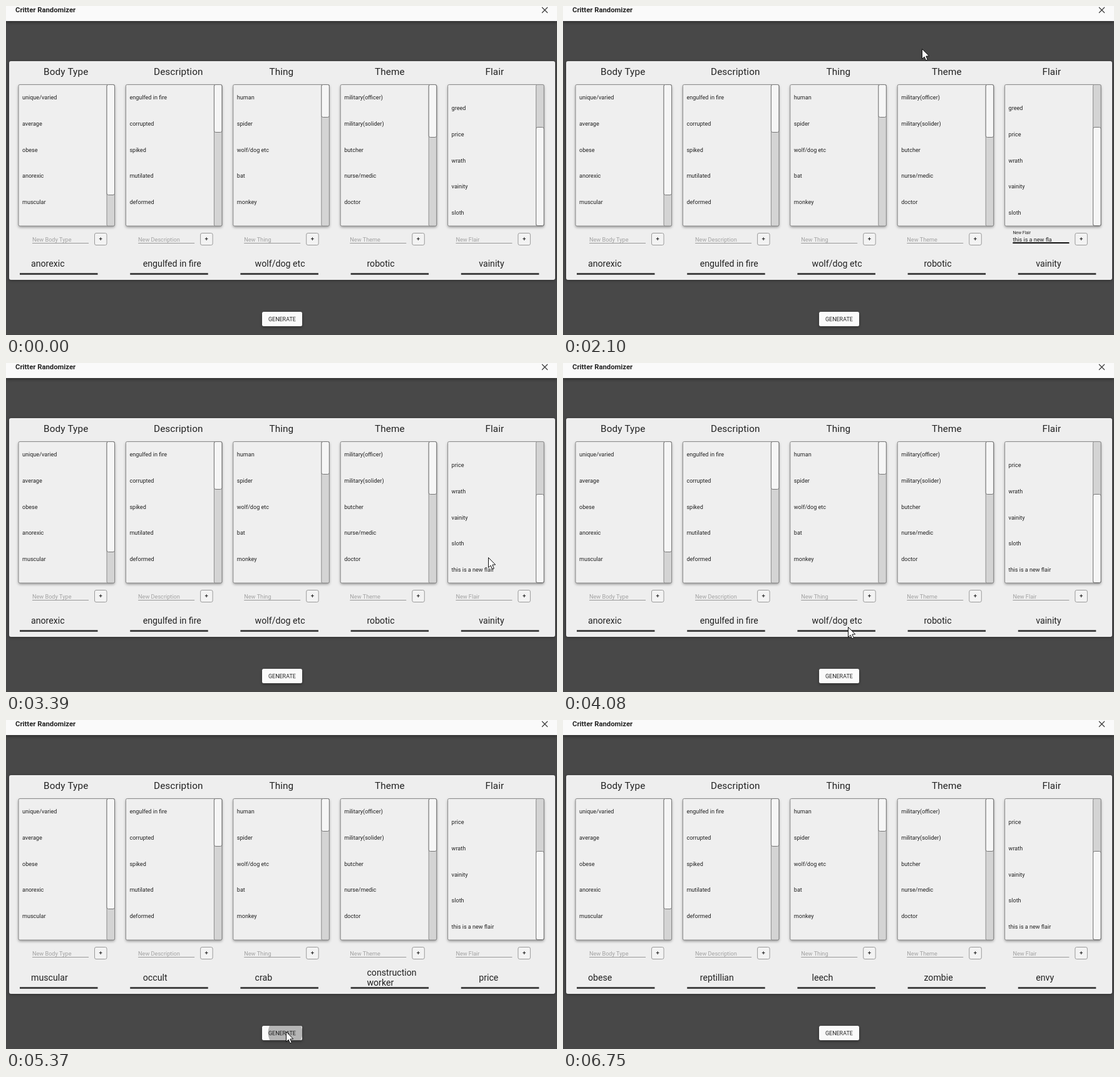
Animation of 880x525 px, one loop 7020 ms. Source, as an HTML page with a canvas:

```html
<!DOCTYPE html>
<html lang="en">
<head>
<meta charset="utf-8">
<title>Critter Randomizer</title>
<style>
  html, body { margin: 0; width: 100%; height: 100%; overflow: hidden; background: #484848; }
  canvas { display: block; width: 880px; height: 525px; }
</style>
</head>
<body>
<canvas id="stage" width="880" height="525"></canvas>
<script>
const ctx = document.getElementById('stage').getContext('2d');
const LOOP = 7020, STEP = 30;
const ROW = 41.8, LIST_TOP = 125.5, LIST_H = 225.5;
const ADDED = 2970, CLICK_FIELD = 240, BLUR = 2640;

const columns = [
  { name: 'Body Type', x: 60, thumb: [126, 302], items: ['unique/varied', 'average', 'obese', 'anorexic', 'muscular'] },
  { name: 'Description', x: 236, thumb: [126, 202], items: ['engulfed in fire', 'corrupted', 'spiked', 'mutilated', 'deformed'] },
  { name: 'Thing', x: 420.5, thumb: [126, 178], items: ['human', 'spider', 'wolf/dog etc', 'bat', 'monkey'] },
  { name: 'Theme', x: 589, thumb: [126, 210], items: ['military(officer)', 'military(solider)', 'butcher', 'nurse/medic', 'doctor'] },
  { name: 'Flair', x: 765.5, items: ['lust', 'greed', 'price', 'wrath', 'vainity', 'sloth'] }
];
const newFlair = 'this is a new flair';

const results = [
  [0, 'anorexic', 'engulfed in fire', 'wolf/dog etc', 'robotic', 'vainity'],
  [4650, 'average', 'corrupted', 'spider', 'butcher', 'gluttony'],
  [5130, 'muscular', 'occult', 'crab', 'construction\nworker', 'price'],
  [5520, 'anorexic', 'spiked', 'bat', 'doctor', 'gluttony'],
  [5940, 'obese', 'mammalian', 'wolf/dog etc', 'nurse/medic', 'sloth'],
  [6510, 'obese', 'reptillian', 'leech', 'zombie', 'envy']
];
const clicks = [4380, 4860, 5220, 5640, 6225];

// typed length at each moment
const typing = [[0, 0], [1050, 2], [1080, 4], [1290, 7], [1500, 9], [1560, 13], [2010, 15], [2070, 17], [2130, 19]];

// pointer path: time, x, y
const path = [
  [90, 830, 372], [210, 786, 368], [270, 786, 368], [630, 573, 68], [2130, 573, 68],
  [2520, 826, 383], [2670, 832, 377], [2880, 832, 377], [3030, 853, 264], [3090, 854, 262],
  [3270, 854, 288], [3390, 770, 310], [3480, 680, 325], [3570, 755, 333], [3750, 430, 372],
  [3900, 168, 410], [4080, 455, 421], [4290, 447, 486], [4350, 447, 497], [6540, 447, 497], [6750, 892, 118]
];

const clamp = v => Math.max(0, Math.min(1, v));
const ease = v => { v = clamp(v); return v * v * (3 - 2 * v); };
const latest = (list, t) => list.filter(k => k[0] <= t).pop();

function slope(i, a) {
  const p = path[i - 1], c = path[i], n = path[i + 1];
  if (!p || !n || (c[a] - p[a]) * (n[a] - c[a]) <= 0) return 0;
  return (n[a] - p[a]) / (n[0] - p[0]);
}

function pointerAt(t) {
  const i = path.findIndex(k => k[0] > t) - 1;
  if (i < 0) return null;
  const a = path[i], b = path[i + 1], d = b[0] - a[0], u = (t - a[0]) / d;
  return [1, 2].map(k =>
    a[k] + (b[k] - a[k]) * u * u * (3 - 2 * u) +
    d * u * (1 - u) * (slope(i, k) * (1 - u) - slope(i + 1, k) * u));
}

function text(s, x, y, size, color = '#222', weight = 400, spacing = 0) {
  ctx.font = `${weight} ${size}px Roboto, sans-serif`;
  ctx.letterSpacing = spacing + 'px';
  ctx.fillStyle = color;
  ctx.fillText(s, x, y);
}

function rect(x, y, w, h, r, fill, stroke) {
  ctx.beginPath();
  ctx.roundRect(x, y, w, h, r);
  ctx.fillStyle = fill;
  ctx.fill();
  if (stroke) {
    ctx.shadowColor = 'transparent';
    ctx.strokeStyle = stroke;
    ctx.lineWidth = 1;
    ctx.stroke();
  }
}

function shadowed(blur, dy, alpha, draw) {
  ctx.save();
  ctx.shadowColor = `rgba(0,0,0,${alpha})`;
  ctx.shadowBlur = blur;
  ctx.shadowOffsetY = dy;
  draw();
  ctx.restore();
}

function bar(x, y, w, h, color) {
  ctx.fillStyle = color;
  ctx.fillRect(x, y, w, h);
}

function drawHeader() {
  shadowed(5, 2, 0.4, () => rect(0, -10, 880, 34, 0, '#fafafa'));
  text('Critter Randomizer', 15, 10, 11.3, '#222', 700);
  ctx.strokeStyle = '#333';
  ctx.lineWidth = 1.1;
  ctx.beginPath();
  ctx.moveTo(856, 2); ctx.lineTo(865, 11);
  ctx.moveTo(865, 2); ctx.lineTo(856, 11);
  ctx.stroke();
}

function drawList(col, i, t) {
  const x = 20 + 171.4 * i, w = 153.5;
  let { items, thumb } = col, first = 149;
  if (i === 4) {
    const added = t >= ADDED, drag = ease((t - 3090) / 180);
    first = 124.2 - (added ? ROW * drag : 0);
    const top = added ? 186 + 24 * drag : 194;
    thumb = [top, top + (added ? 141 : 157)];
    if (added) items = items.concat(newFlair);
  }
  shadowed(4, 2, 0.4, () => rect(x, LIST_TOP, w, LIST_H, 2, '#efefef', '#8a8a8a'));
  ctx.save();
  ctx.beginPath();
  ctx.rect(x + 0.5, 126, w - 1, LIST_H - 1);
  ctx.clip();
  items.forEach((s, k) => text(s, x + 6, first + ROW * k, 9.07));
  ctx.restore();
  rect(x + w - 12.5, LIST_TOP, 12.5, LIST_H, 2, '#d4d4d4', '#8a8a8a');
  rect(x + w - 12.5, thumb[0] - 0.5, 12.5, thumb[1] - thumb[0], 2.5, '#f6f6f6', '#777');
}

function drawField(col, i, t) {
  const x = 42 + 169.1 * i, flair = i === 4;
  const focused = flair && t >= CLICK_FIELD && t < BLUR;
  const up = flair ? ease((t - CLICK_FIELD) / 300) * (1 - ease((t - ADDED) / 240)) : 0;
  const grey = '#a2a2a2';
  text('New ' + col.name, x, 375.5 - 11.7 * up, 9.15 - 2.25 * up, focused ? '#222' : grey);
  if (flair && t < ADDED) {
    const typed = newFlair.slice(0, latest(typing, t)[1]);
    text(typed, x, 375.5, 9.07, t < 2010 ? '#666' : '#222');
  }
  if (focused) {
    const grow = ease((t - CLICK_FIELD) / 240);
    bar(x, 378, 90, 1, '#999');
    bar(x + 45 * (1 - grow), 377, 90 * grow, 2, '#111');
  } else {
    bar(x, 378, 90, 1, '#999');
  }
  const pressed = flair && t >= 2670 && t < 3000;
  rect(x + 99.5, 362.5, 19.5, 19, 2.5, pressed ? '#d8d8d8' : '#f3f3f3', '#9a9a9a');
  text('+', x + 106.5, 375.2, 9.5, '#222', 500);
}

function drawResult(s, i) {
  const lines = s.split('\n');
  const y = lines.length > 1 ? 408 : 416;
  lines.forEach((line, k) => text(line, 40 + 178.8 * i, y + 15.7 * k, 14.17));
  bar(22 + 176.2 * i, 426, 124.5, 3, '#444');
}

function drawGenerate(t) {
  shadowed(4, 2, 0.35, () => rect(409, 488, 64, 23, 2.5, '#fafafa'));
  text('GENERATE', 419, 503, 8.95);
  ctx.save();
  ctx.beginPath();
  ctx.roundRect(409, 488, 64, 23, 2.5);
  ctx.clip();
  for (const c of clicks) {
    const age = t - c;
    if (age < 0 || age > 290) continue;
    ctx.beginPath();
    ctx.arc(446, 499, 5 + 0.15 * age, 0, Math.PI * 2);
    ctx.fillStyle = `rgba(0,0,0,${0.58 - 0.002 * age})`;
    ctx.fill();
  }
  ctx.restore();
}

function drawPointer(t) {
  const p = pointerAt(t);
  if (!p) return;
  ctx.save();
  ctx.translate(Math.round(p[0]) + 0.5, Math.round(p[1]) + 0.5);
  ctx.beginPath();
  [[0, 0], [0, 16], [3.6, 12.6], [6.2, 18.3], [8.8, 17.2], [6.3, 11.6], [11.2, 11.4]]
    .forEach(q => ctx.lineTo(...q));
  ctx.closePath();
  ctx.fillStyle = '#fff';
  ctx.strokeStyle = '#111';
  ctx.lineWidth = 1;
  ctx.fill();
  ctx.stroke();
  ctx.restore();
}

function draw(t) {
  bar(0, 0, 880, 525, '#484848');
  drawHeader();
  shadowed(4, 1, 0.4, () => rect(5, 88, 872, 349, 3, '#eeeeee'));
  const picks = latest(results, t);
  columns.forEach((col, i) => {
    text(col.name, col.x, 110, 15.3, '#222', 400, 0.1);
    drawList(col, i, t);
    drawField(col, i, t);
    drawResult(picks[i + 1], i);
  });
  drawGenerate(t);
  drawPointer(t);
}

const start = performance.now();
function tick() {
  const t = (performance.now() - start) % LOOP;
  draw(Math.floor(t / STEP) * STEP);
  requestAnimationFrame(tick);
}
tick();
</script>
</body>
</html>
```
